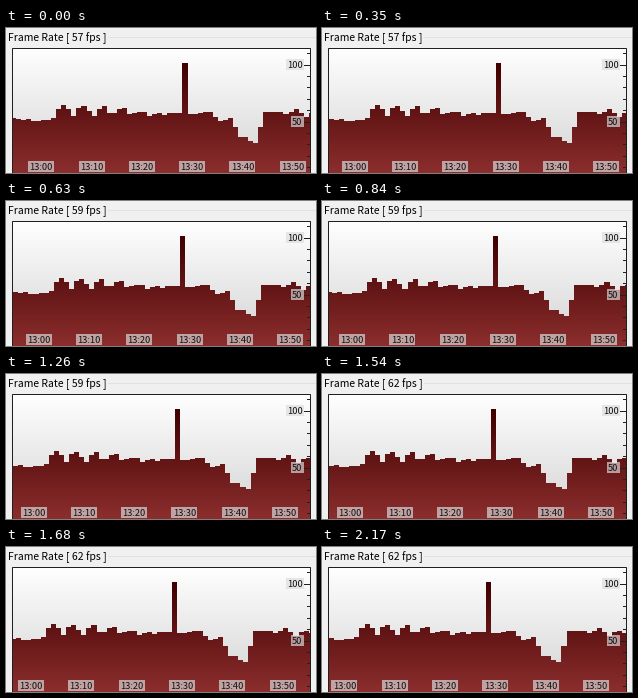
A matplotlib script for the animation above (2.45 s loop, 310 by 145 pixels).

```python
import numpy as np
import matplotlib.pyplot as plt
from matplotlib.animation import FuncAnimation
from matplotlib.patches import Rectangle

W, H, DPI = 310, 145, 100
PX = 72 / DPI
TICK_MS, LOOP_MS = 70, 2450
FONT = "Noto Sans CJK JP"
PAGE = "#f0f0f0"

LEFT, TOP, RIGHT = 6, 20, 305
BAR, STEP = 5.05, 2.55
SPIKE_X = 176.5
SHIFTS = [350, 840, 1260, 1680, 2170]
READINGS = [(0, 57), (630, 59), (1540, 62)]

# Slow trend of the frame rate: (seconds after the spike, fps).
TREND = [(-34, 53), (-27, 51), (-25, 61), (-12, 60), (-7, 57), (5, 58),
         (7, 51), (9, 54), (11, 37), (14, 32), (16, 59), (28, 57)]


def frame_rates(k):
    """Trend plus two bursts of ripple, a little jitter and one spike."""
    bursts = np.exp(-((k + 19) / 8) ** 2) + np.exp(-((k - 23) / 2) ** 2)
    ripple = 5 * bursts * np.cos(2 * np.pi * (k + 20.1) / 3.83)
    jitter = np.random.default_rng(4).normal(0, .6, len(k))
    fps = np.interp(k, *zip(*TREND)) + ripple + jitter
    return np.where(k == 0, 102, fps)


def y_of(fps):
    return 94 - (fps - 50) * 1.14


def gradient(y0, c0, c1):
    t = np.clip((np.arange(H) + .5 - y0) / (H - y0), 0, 1)[:, None, None]
    return np.array(c0) * (1 - t) + np.array(c1) * t


seconds = np.arange(-36, 34)
bar_tops = y_of(frame_rates(seconds))

BACK = gradient(TOP, (1, 1, 1), (.827, .827, .827))
FILL = gradient(35, (.25, 0, 0), (.55, .18, .18))
cols = np.arange(LEFT, RIGHT) + .5
rows = np.arange(H)[:, None] + .5

fig = plt.figure(figsize=(W / DPI, H / DPI), dpi=DPI, facecolor=PAGE)
ax = fig.add_axes([0, 0, 1, 1])
ax.set_xlim(0, W)
ax.set_ylim(H, 0)
ax.axis("off")
plot = ax.imshow(BACK, extent=(LEFT, RIGHT, H, 0), aspect="auto",
                 interpolation="nearest", zorder=1)
ax.add_patch(Rectangle((0, 0), W, TOP, color=PAGE, lw=0, zorder=2))


def line(xs, ys, color="#202020"):
    ax.plot(xs, ys, color=color, lw=PX, zorder=4, snap=False,
            solid_capstyle="butt", solid_joinstyle="miter")


def tag(x, y, width, text):
    """Small value label on a translucent plate, centred on (x, y)."""
    plate = Rectangle((x - width / 2, y - 5.5), width, 11, lw=0,
                      color="#dcdcdc", alpha=.68, zorder=5)
    ax.add_patch(plate)
    label = ax.text(x, y + 3.7, text, family=FONT, size=9.3 * PX,
                    ha="center", va="baseline", color="#101010", zorder=6)
    return plate, label


line([102, W], [9.5, 9.5], "#e2e2e2")
line([LEFT + .5, LEFT + .5, RIGHT - .5, RIGHT - .5],
     [H, TOP + .5, TOP + .5, H])
for fps in range(10, 120, 10):
    y = np.floor(y_of(fps)) + .5
    line([RIGHT - (7 if fps % 50 == 0 else 4), RIGHT], [y, y])
tag(289, 36.5, 18, "100")
tag(291, 93.5, 13, "50")

times = [tag(0, 138.5, 26, f"13:{m:02d}") for m in range(0, 60, 10)]
title = ax.text(2, 13.2, "", family=FONT, size=10.4 * PX,
                va="baseline", color="black", zorder=6)


def draw(i):
    now = i * TICK_MS
    shift = STEP * sum(now >= t for t in SHIFTS)

    second = np.floor((cols - SPIKE_X + shift) / BAR).astype(int)
    tops = bar_tops[second - seconds[0]]
    plot.set_data(np.where((rows >= tops)[..., None], FILL, BACK))

    for k, (plate, label) in enumerate(times):
        x = 35.2 + 50.3 * k - shift
        plate.set_x(x - 13)
        label.set_x(x)

    fps = [v for t, v in READINGS if now >= t][-1]
    title.set_text(f"Frame Rate [ {fps} fps ]")
    return []


anim = FuncAnimation(fig, draw, frames=LOOP_MS // TICK_MS, interval=TICK_MS,
                     repeat=True, repeat_delay=0)
plt.show()
```
